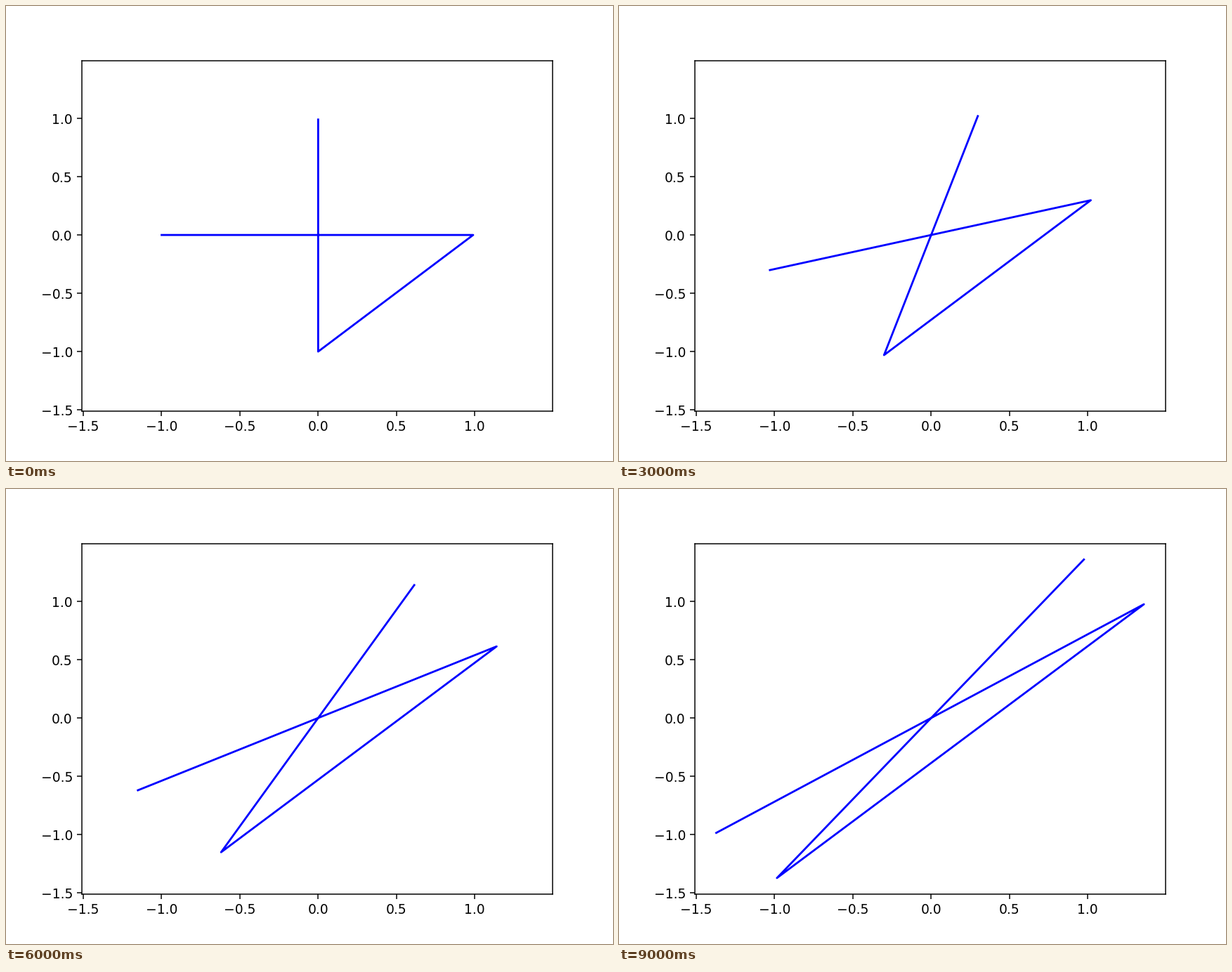
A matplotlib script that plays this animation: 864x648 px, repeating every 10 s.

```python
import numpy as np
import matplotlib.pyplot as plt
from matplotlib.animation import FuncAnimation

STEPS = 10
SHEAR = np.array([[1.0, 0.1], [0.1, 1.0]])

# A horizontal stroke followed by a vertical one, as one path
s = np.arange(-1, 1, 0.01)
zero = np.zeros_like(s)
cross = np.array([np.append(s, zero), np.append(zero, s)])


def pose(step):
    return np.linalg.matrix_power(SHEAR, step) @ cross


fig, ax = plt.subplots(figsize=(6.4, 4.8), dpi=135)
line, = ax.plot(*pose(0), "b-", lw=1.5)

# The widest pose sets the limits, with a 5 % margin
widest = pose(STEPS - 1)
low, high = widest.min(), widest.max()
pad = 0.05 * (high - low)
ax.set(xlim=(low - pad, high + pad), ylim=(low - pad, high + pad))


def update(step):
    line.set_data(*pose(step))
    return line,


anim = FuncAnimation(fig, update, frames=STEPS, interval=1000, repeat=True)
plt.show()
```
